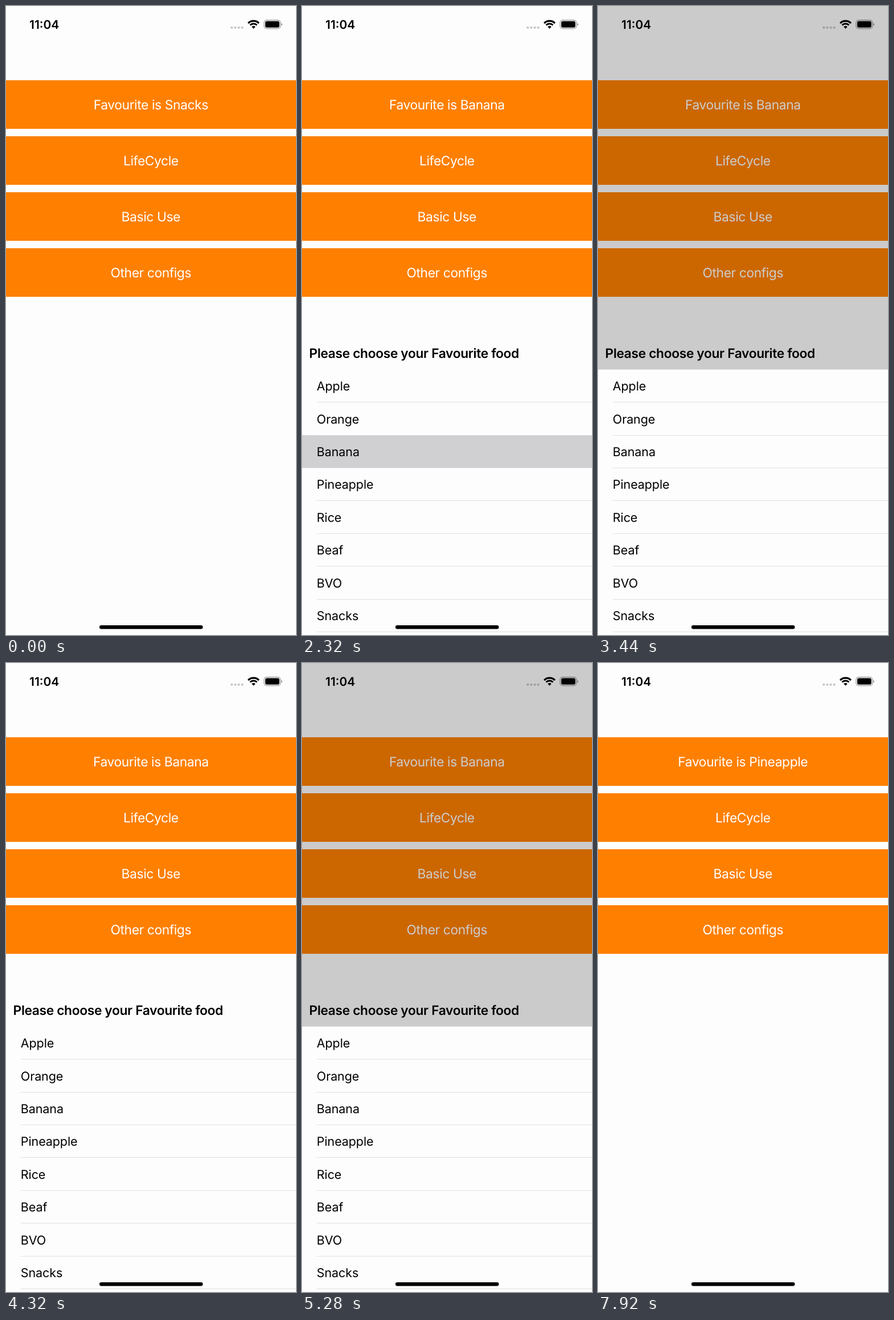
Recreate the animation shown at these times as an HTML page. Size 509 by 1101 pixels, loop 8 s.

```html
<!DOCTYPE html>
<html lang="en">
<head>
<meta charset="utf-8">
<title>Favourite food picker</title>
<style>
  html, body { margin: 0; width: 100%; height: 100%; overflow: hidden; background: #fdfdfd; }
  svg { display: block; width: 100%; height: 100%; }
  text {
    font-family: Inter, "Liberation Sans", sans-serif;
    font-optical-sizing: none;
    text-rendering: geometricPrecision;
  }
  .button rect { fill: #ff8000; }
  .button text { fill: #fff; font-size: 22.8px; letter-spacing: -.4px; text-anchor: middle; }
  .row { font-size: 21.5px; letter-spacing: -.1px; }
  .header { font-size: 22.8px; font-weight: 600; letter-spacing: -.37px; }
  .clock { font-size: 21px; font-weight: 600; }
</style>
</head>
<body>
<svg viewBox="0 0 509 1101" preserveAspectRatio="none">
  <rect width="509" height="1101" fill="#fdfdfd"/>
  <g id="buttons"></g>
  <rect id="dim" width="509" height="1101" opacity="0"/>

  <g id="sheet" transform="translate(0 522)">
    <text class="header" x="12.6" y="616.2">Please choose your Favourite food</text>
    <rect y="636.4" width="509" height="470" fill="#fdfdfd"/>
    <rect id="mark" width="509" height="57.4" fill="#d0d0d3" visibility="hidden"/>
    <g id="rows"></g>
  </g>

  <g id="status">
    <text class="clock" x="41" y="40">11:04</text>
    <g opacity=".21">
      <circle cx="396.3" cy="37.8" r="2.1"/>
      <circle cx="402.4" cy="37.8" r="2.1"/>
      <circle cx="408.5" cy="37.8" r="2.1"/>
      <circle cx="414.6" cy="37.8" r="2.1"/>
    </g>
    <g fill="none" stroke="#000">
      <path d="M425.1 30.1a13.3 13.3 0 0 1 18.8 0" stroke-width="3.2"/>
      <path d="M428.56 33.56a8.4 8.4 0 0 1 11.88 0" stroke-width="3"/>
    </g>
    <path d="M434.5 39.7l-3.2-3.3a4.5 4.5 0 0 1 6.4 0z"/>
    <rect x="453.1" y="24.6" width="28.6" height="15" rx="4.4" fill="none" stroke="#000" stroke-opacity=".4" stroke-width="1.3"/>
    <rect x="455" y="26.5" width="24.8" height="11.2" rx="2.7"/>
    <path d="M483.2 29.7a2.6 2.6 0 0 1 0 4.9z" opacity=".45"/>
  </g>
  <rect x="164" y="1084" width="181.5" height="6.5" rx="3.25"/>
</svg>

<script>
const LOOP = 8000, STEP = 80;
const SHEET = 522, ROW = 57.4, TOP = 636.4;
const OPEN_MS = 200, CLOSE_MS = 320;
const foods = ["Apple", "Orange", "Banana", "Pineapple", "Rice", "Beaf", "BVO", "Snacks"];

// Each visit of the sheet; pick is the row tapped, -1 when dismissed from outside.
const visits = [
  { open: 1200, close: 2320, pick: 2 },
  { open: 3229, close: 4360, clear: 4320, pick: -1 },
  { open: 5001, close: 6240, pick: 3 }
];

const $ = id => document.getElementById(id);

function add(parent, tag, attrs, label) {
  const el = document.createElementNS("http://www.w3.org/2000/svg", tag);
  for (const key in attrs) el.setAttribute(key, attrs[key]);
  if (label) el.textContent = label;
  return parent.appendChild(el);
}

const titles = ["Favourite is Snacks", "LifeCycle", "Basic Use", "Other configs"].map((label, i) => {
  const g = add($("buttons"), "g", { class: "button", transform: `translate(0 ${130 + i * 98})` });
  add(g, "rect", { width: 509, height: 85 });
  return add(g, "text", { x: 254.3, y: 51.2 }, label);
});

foods.forEach((food, i) => {
  const y = TOP + i * ROW;
  add($("rows"), "text", { class: "row", x: 25.8, y: y + 36.8 }, food);
  add($("rows"), "rect", { x: 26, y: Math.round(y + ROW - 0.6), width: 483, height: 1, fill: "#e0e0e2" });
});

function ease(t) {
  t = Math.min(1, Math.max(0, t));
  return (1 - Math.cos(Math.PI * t)) / 2;
}

function draw(t) {
  let shown = 0, dim = 0, mark = -1, food = "Snacks";
  for (const v of visits) {
    if (t < v.open) break;
    const rise = ease((t - v.open) / OPEN_MS);
    shown = rise - ease((t - v.close) / CLOSE_MS);
    const leaving = t >= (v.clear || v.close);
    dim = leaving ? 0 : 0.2 * rise;
    mark = leaving ? v.pick : -1;
    if (mark >= 0) food = foods[mark];
  }
  titles[0].textContent = "Favourite is " + food;
  $("dim").setAttribute("opacity", dim);
  $("sheet").setAttribute("transform", `translate(0 ${(SHEET * (1 - shown)).toFixed(2)})`);
  $("mark").setAttribute("visibility", mark < 0 ? "hidden" : "visible");
  $("mark").setAttribute("y", TOP + Math.max(0, mark) * ROW);
}

const start = performance.now();
function tick() {
  const t = (performance.now() - start) % LOOP;
  draw(Math.floor(t / STEP) * STEP);
  requestAnimationFrame(tick);
}
tick();
</script>
</body>
</html>
```
